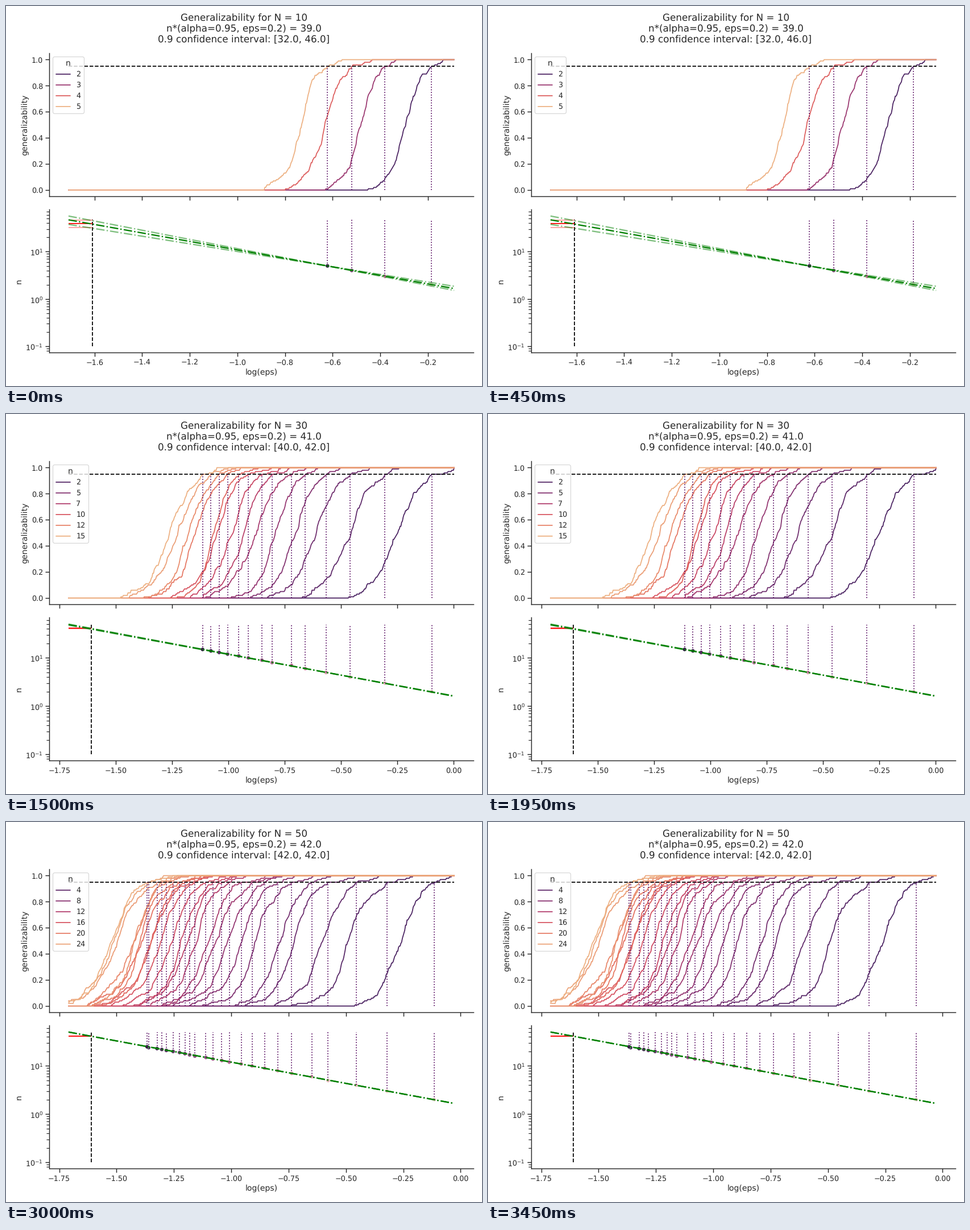
Write a matplotlib script that moves like this. It is 837 px wide and 669 px high and loops after 3.75 s.

```python
import numpy as np
import matplotlib.pyplot as plt
from matplotlib.animation import FuncAnimation
from matplotlib.colors import LinearSegmentedColormap
from matplotlib.ticker import MaxNLocator

W, H, DPI = 837, 669, 83.7
INK = "0.15"
DOTS = "#5a1064"
ALPHA = 0.95
EPS_X = np.log(0.2)
X_MIN = EPS_X - 0.1

plt.rcParams.update({
    "font.family": "DejaVu Sans", "font.size": 12, "text.hinting": "none",
    "axes.labelsize": 12, "xtick.labelsize": 11, "ytick.labelsize": 11,
    "legend.fontsize": 11, "legend.title_fontsize": 12,
    "text.color": INK, "axes.labelcolor": INK, "axes.edgecolor": INK,
    "xtick.color": INK, "ytick.color": INK,
    "axes.linewidth": 1.25, "axes.spines.top": False, "axes.spines.right": False,
    "xtick.major.size": 6, "ytick.major.size": 6, "ytick.minor.size": 4,
    "xtick.major.width": 1.25, "ytick.major.width": 1.25, "ytick.minor.width": 1,
    "lines.linewidth": 1.5, "lines.solid_capstyle": "round",
})

FLARE = LinearSegmentedColormap.from_list("dusk", [
    "#4b2362", "#6c2b6d", "#8f3371", "#b13c6c",
    "#d14a61", "#e3685c", "#e98d6b", "#edb081"])

SCENES = [
    dict(N=10, star=39, ci=(32, 46), x_max=-0.089, slope=2.064),
    dict(N=20, star=41, ci=(41, 43), x_max=-0.014, slope=2.024),
    dict(N=30, star=41, ci=(40, 42), x_max=0.002, slope=1.999),
    dict(N=40, star=40, ci=(40, 41), x_max=-0.0295, slope=1.977),
    dict(N=50, star=42, ci=(42, 42), x_max=-0.028, slope=2.03),
]


def helix(t):
    """Pale pink (t=0) to dark violet (t=1)."""
    x = 0.85 - 0.7 * np.asarray(t, float)
    amp, phi = 0.4 * x * (1 - x), 0.8 * np.pi * x
    c, s = np.cos(phi), np.sin(phi)
    rgb = [x + amp * (p * c + q * s) for p, q in
           ((-0.14861, 1.78277), (-0.29227, -0.90649), (1.97294, 0))]
    return np.clip(np.transpose(rgb), 0, 1)


def unrounded(n):
    """Fitted value behind a size that was rounded up."""
    return n - 0.7


def legend_levels(sizes):
    """All sizes if they are few, else evenly spaced round values."""
    if len(sizes) <= 6:
        return sizes
    ticks = MaxNLocator(6).tick_values(sizes[0], sizes[-1])
    return [t for t in ticks if sizes[0] <= t < sizes[-1] + 1]


def roughen(x, rng):
    """Give the gaps random sizes but keep both ends."""
    gaps = np.diff(x) * rng.gamma(2, size=len(x) - 1)
    steps = np.concatenate([[0], np.cumsum(gaps)])
    return x[0] + steps * (x[-1] - x[0]) / steps[-1]


def samples(q95, half, rng):
    """Places where a curve reaches 0.01, 0.02 ... 1; half is the median-to-95 % gap."""
    u = np.linspace(1, 0, 50)
    v = np.linspace(0, 1, 46)
    mid = q95 - half
    low = mid - 1.45 * half * (0.45 * u + 0.55 * u ** 6)
    high = mid + half * (0.55 * v + 0.45 * v ** 4)
    tail = np.linspace(q95, q95 + half * rng.uniform(0.4, 0.8), 6)
    low, high, tail = (roughen(part, rng) for part in (low, high, tail))
    return np.concatenate([low, high[1:], tail[1:]])


fig = plt.figure(figsize=((W + 0.01) / DPI, (H + 0.01) / DPI), dpi=DPI, facecolor="white")


def panel(top, bottom, left=76, right=822):
    return fig.add_axes([left / W, 1 - bottom / H, (right - left) / W, (bottom - top) / H])


upper, lower = panel(83, 335.5), panel(358.3, 610.5)
title = fig.suptitle("", fontsize=14.4)


def draw_curves(sizes, q95, width, span, rng):
    def shade(n):
        return FLARE((n - sizes[0]) / (sizes[-1] - sizes[0]))

    grid = np.linspace(*span, 500)
    for n, x in zip(sizes, q95):
        steps = samples(x, width * rng.normal(1, 0.08), rng)
        steps = np.minimum(steps, span[1])
        share = np.searchsorted(steps, grid, side="right") / len(steps)
        upper.plot(grid, share, color=shade(n))
    upper.hlines(ALPHA, *span, color="black", ls="--")
    upper.vlines(q95, 0, ALPHA, color=DOTS, ls=":")

    levels = legend_levels(sizes)
    keys = [upper.plot([], [], color=shade(n))[0] for n in levels]
    upper.legend(keys, [str(int(n)) for n in levels], title="n",
                 loc="upper left", framealpha=0.8, edgecolor="0.8")
    upper.set_ylim(-0.05, 1.05)
    upper.set_ylabel("generalizability")
    upper.tick_params(labelbottom=False)


def draw_fit(scene, sizes, q95, span):
    star, slope = unrounded(scene["star"]), scene["slope"]
    center = star * np.exp(-slope * (span - EPS_X))
    peak = center[0]

    # The bounds swing about the point where the fit reaches n = 5.
    pivot_gap = np.log(star / 5) / slope
    bounds = []
    for n in map(unrounded, scene["ci"]):
        tilt = np.log(n / 5) / pivot_gap
        bounds.append(n * np.exp(-tilt * (span - EPS_X)))

    lower.set_yscale("log")
    lower.scatter(q95, sizes, s=36, c=helix((sizes - sizes[0]) / (sizes[-1] - sizes[0])),
                  edgecolors="white", linewidths=0.48, zorder=1.5)
    lower.vlines(q95, sizes, peak, color=DOTS, ls=":")
    lower.vlines(EPS_X, 0.1, peak, color="black", ls="--")
    lower.hlines(scene["ci"], X_MIN, EPS_X, color="red", alpha=0.4)
    lower.hlines(scene["star"], X_MIN, EPS_X, color="red")
    lower.plot(span, center, color="green", ls="-.", lw=2)
    for line in bounds:
        lower.plot(span, line, color="green", ls="-.", lw=2, alpha=0.5)

    top = max(peak, bounds[1][0])
    pad = np.log10(top / 0.1) / 20
    lower.set_ylim(0.1 / 10 ** pad, top * 10 ** pad)
    lower.set_ylabel("n")
    lower.set_xlabel("log(eps)")


def draw(i):
    scene = SCENES[i]
    N = scene["N"]
    rng = np.random.default_rng(N)
    span = np.array([X_MIN, scene["x_max"]])
    sizes = np.arange(2, N // 2 + 1)
    q95 = EPS_X + np.log(unrounded(scene["star"]) / sizes) / scene["slope"]
    q95 += rng.normal(0, 0.006, len(sizes))

    upper.clear()
    lower.clear()
    draw_curves(sizes, q95, 0.16 - 0.5 / N, span, rng)
    draw_fit(scene, sizes, q95, span)
    margin = (span[1] - span[0]) / 20
    for ax in (upper, lower):
        ax.set_xlim(span[0] - margin, span[1] + margin)
    low, high = scene["ci"]
    title.set_text(f"Generalizability for N = {N}\n"
                   f"n*(alpha={ALPHA}, eps=0.2) = {scene['star']:.1f}\n"
                   f"0.9 confidence interval: [{low:.1f}, {high:.1f}]")
    return []


anim = FuncAnimation(fig, draw, frames=len(SCENES), interval=750,
                     init_func=lambda: [], repeat=True, repeat_delay=0)
plt.show()
```
